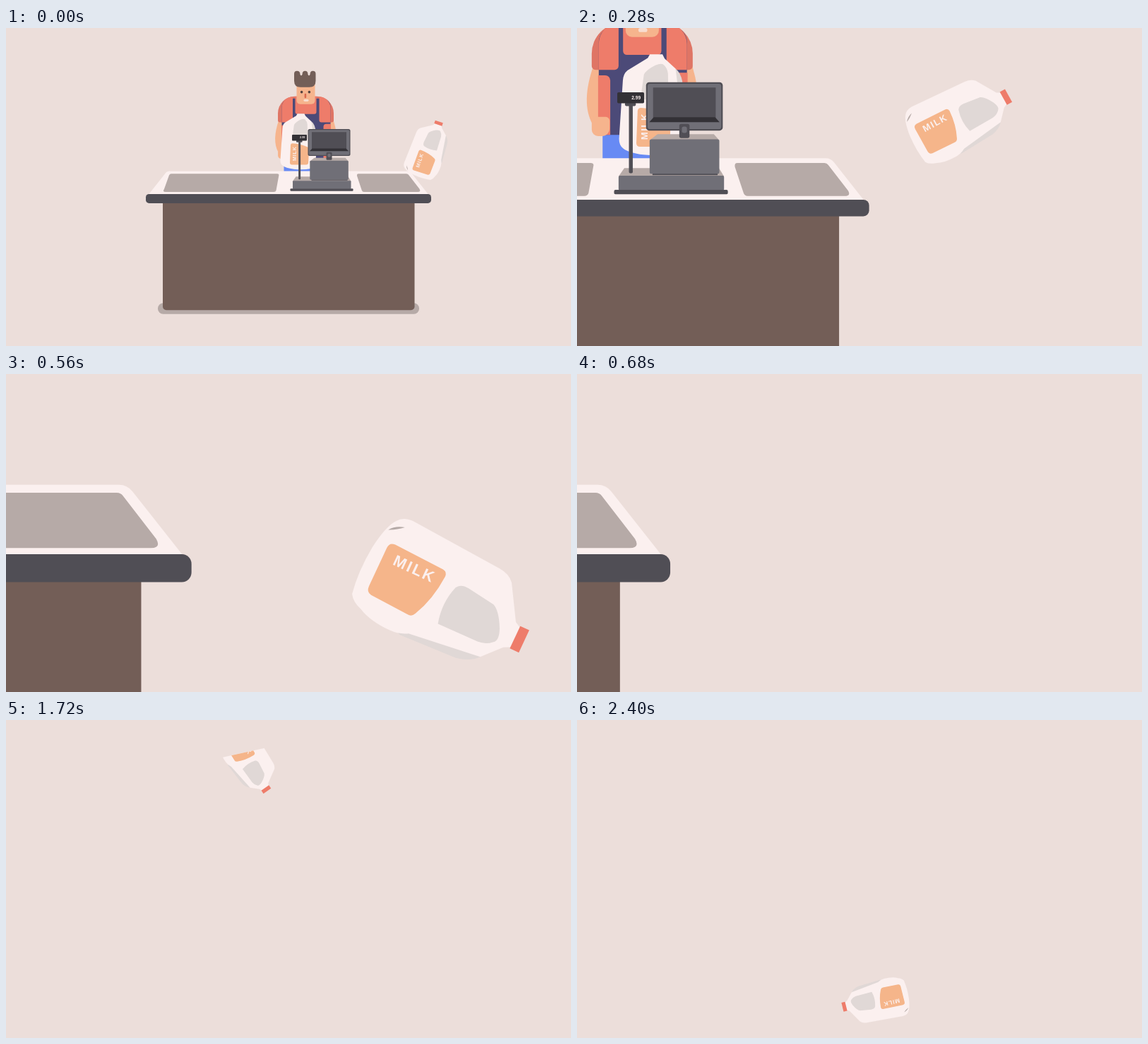
These frames come from a looping animation (800 px wide and 450 px high, 2.44 s). An HTML page with a canvas:

```html
<!DOCTYPE html>
<html lang="en">
<head>
<meta charset="utf-8">
<title>Milk checkout</title>
<style>
html, body { margin: 0; width: 100%; height: 100%; overflow: hidden; background: #ecdeda; }
canvas { display: block; }
</style>
</head>
<body>
<canvas id="stage" width="800" height="450"></canvas>
<script>
const ctx = document.getElementById('stage').getContext('2d');
const LOOP = 2440, STEP = 40;
const C = {
  bg: '#ecdeda', white: '#fbf0ef', shade: '#e0d8d6', label: '#f5b58a', red: '#ee7c6a', darkRed: '#df7565',
  skin: '#f6b48d', brown: '#735e57', navy: '#4c4a78', blue: '#678af4', taupe: '#b6aaa7',
  dark: '#504e55', grey: '#706f77', black: '#333136'
};
const FONT = '"Liberation Sans", Arial, sans-serif';
const clamp = v => Math.min(1, Math.max(0, v));

function path(color, d) {
  ctx.fillStyle = color;
  ctx.fill(new Path2D(d));
}
function box(color, x1, y1, x2, y2, r = 0) {
  ctx.fillStyle = color;
  ctx.beginPath();
  ctx.roundRect(x1, y1, x2 - x1, y2 - y1, r);
  ctx.fill();
}
function text(str, x, y, size, spacing = 0) {
  ctx.fillStyle = C.white;
  ctx.font = `bold ${size}px ${FONT}`;
  ctx.letterSpacing = spacing + 'px';
  ctx.textAlign = 'center';
  ctx.fillText(str, x + spacing / 2, y);
}

function bottle(x, y, degrees, scale, falling = true) {
  ctx.save();
  ctx.translate(x, y);
  ctx.rotate(degrees * Math.PI / 180);
  ctx.scale(scale, scale);
  path(C.shade, 'M60 52 L66 38 L62 -48 Q58 -68 46 -78 L30 0 Z');
  path(C.white, 'M-15 -112 L-20 -103 L-68 -74 Q-78 -66 -79 -50 L-88 88 Q-88 104 -78 111 ' +
    'Q-66 121 -30 126 Q10 130 42 124 Q52 118 56 104 Q66 85 66 54 Q66 40 59 28 L46 -78 L20 -102 L15 -112 Z');
  path(C.shade, 'M29 -4 Q0 4 -28 -5 Q-36 -9 -35 -22 L-29 -64 Q-24 -75 -2 -86 Q14 -93 19 -86 Q27 -78 28 -66 Z');
  path(C.label, 'M-47 98 L-44 22 Q-43 15 -36 15 Q0 17 29 31 Q36 34 35 41 L32 99 Q31 107 22 107 L-38 107 Q-47 107 -47 98 Z');
  if (falling) {
    box(C.red, -17.5, -125, 17.5, -111);
    path('#b5aaa7', 'M-62 116 Q-72 109 -75 96 Q-66 106 -62 116 Z');
  }
  ctx.rotate(-Math.PI / 2);
  text('MILK', -60, -20, 22, 2.5);
  ctx.restore();
}

function cashier() {
  path(C.skin, 'M387 130 C380 150 380 165 386 176 H396 V130 Z');
  path(C.skin, 'M464 130 Q470 150 469 168 H458 V130 Z');
  box(C.blue, 394, 182, 460, 206);
  box(C.darkRed, 385.5, 97, 464.5, 133.7, [24, 24, 3, 3]);
  box(C.navy, 391, 100, 460, 184.5, [12, 12, 0, 0]);
  box(C.red, 391, 97.5, 406.5, 133.7, [20, 0, 4, 0]);
  box(C.red, 444, 97.5, 460, 133.7, [0, 20, 0, 4]);
  box(C.red, 410, 97, 440, 122, [0, 0, 3, 3]);
  box(C.red, 390.5, 138, 400, 184.5, [0, 4, 0, 0]);
  box(C.red, 450, 136, 460.5, 184.5, [4, 0, 0, 0]);
  box(C.skin, 385.5, 170.5, 399.5, 185.5, [2, 3, 6, 5]);
  box(C.skin, 412, 74, 438, 108, [0, 0, 5, 5]);
  path(C.brown, 'M408.5 65 Q408.5 61 412.5 61 Q417 61 417 66 Q418.5 69 420 66 Q420 61 424 61 Q428 61 428 66 ' +
    'Q429.5 69 431 66 Q431 61 435 61 Q439 61 439 65 V75 Q439 84 430 84 H417.5 Q408.5 84 408.5 75 Z');
  box('#55423e', 417.3, 89, 420.9, 92.8, 1.8);
  box('#55423e', 428.1, 89, 431.7, 92.8, 1.8);
  box('#d9694f', 423.1, 93, 425.7, 99.5, 1.3);
  box('#f8ddd0', 422, 101, 429, 104.2, 1.6);
}

function counter() {
  box(C.taupe, 215.5, 389.5, 585.5, 405, 7.5);
  box(C.brown, 222.5, 240, 579, 399.5, 5);
  path(C.white, 'M201.5 237 L226 206 Q228.5 202.8 232.5 202.8 H568.5 Q572.5 202.8 575 206 L599.5 237 Z');
  path(C.taupe, 'M234.5 206.5 H384.5 Q387.5 206.5 386.8 209 L383 230 Q382.5 232.3 379.5 232.3 H226.5 Q221.5 232.3 224.5 228 L231.5 208.5 Q232.5 206.5 234.5 206.5 Z');
  path(C.taupe, 'M499.5 206.5 H567.5 Q569.5 206.5 570.5 208 L586 228 Q588.5 232.3 583.5 232.3 H507.5 Q505 232.3 504.3 230 L497.5 209.5 Q497 206.5 499.5 206.5 Z');
  box(C.dark, 198.5, 235.2, 602.5, 248.2, 4.5);
}

function register() {
  path(C.taupe, 'M411 210.5 H485 L489 217 H406.5 Z');
  box(C.grey, 406.5, 216.5, 489, 228, 1);
  box(C.dark, 433, 214.5, 484, 216);
  path(C.taupe, 'M437 184 H481 L485.5 189 H430.5 Z');
  box(C.grey, 430.8, 188, 485.3, 215, 1.5);
  box(C.dark, 414.6, 160, 417.6, 214.5, 1);
  box(C.dark, 403, 227.5, 492, 231, 1);
  box(C.dark, 411.5, 159, 420, 162, 1);
  box(C.black, 405.5, 151.3, 426.5, 159.8, 1);
  text('2.99', 420.2, 156.6, 3.7);
  box(C.dark, 428, 143.4, 488, 181.2, 2.5);
  box(C.grey, 429.2, 144.6, 486.8, 180, 2);
  box(C.dark, 433.5, 147.5, 482.5, 172);
  path(C.black, 'M434 170.8 H482 L485.5 174.6 H430.5 Z');
  box(C.dark, 454, 176, 462, 187, 1.5);
  box(C.grey, 456, 178, 460, 183, 1.5);
}

function shop(t) {
  const u = t / 280;
  const k = Math.min(u, 2);
  const zoom = 1 + 0.605 * k + 0.205 * k * k;
  const centre = 400 - 880 * clamp((t - 32) / 620);
  ctx.save();
  ctx.translate(centre, 225);
  ctx.scale(zoom, zoom);
  ctx.translate(-400.5, -225.3);
  cashier();
  bottle(418 + 0.064 * t, 158.5, 0, 0.33, false);
  counter();
  register();
  if (t < 680) {
    const y = 172 - 39.65 * u + 41.45 * u * u + 15 * u * (u - 1) * (u - 2);
    bottle(601 + 89.25 * u - 14.75 * u * u, y, 18 + 37.5 * u + 5.5 * u * u, 0.33);
  }
  ctx.restore();
}

function landing(t) {
  const fall = Math.min(t, 325);
  const tip = clamp((t - 325) / 235);
  ctx.save();
  // The jug drops out from behind a slanted edge.
  ctx.clip(new Path2D('M0 120.4 L800 -55.9 V450 H0 Z'));
  bottle(343 + 0.217 * fall + 7.9 * tip,
    62 + 0.75 * fall + 0.0008 * fall * fall + 4.7 * tip,
    145 + 0.0357 * fall + 99.4 * tip, 0.375);
  ctx.restore();
}

function draw(now) {
  const t = Math.floor(now % LOOP / STEP) * STEP;
  ctx.fillStyle = C.bg;
  ctx.fillRect(0, 0, 800, 450);
  if (t < 1000) shop(t);
  else if (t >= 1720) landing(t - 1720);
}

let start;
function tick(now) {
  start ??= now;
  draw(now - start);
  requestAnimationFrame(tick);
}
requestAnimationFrame(tick);
</script>
</body>
</html>
```
